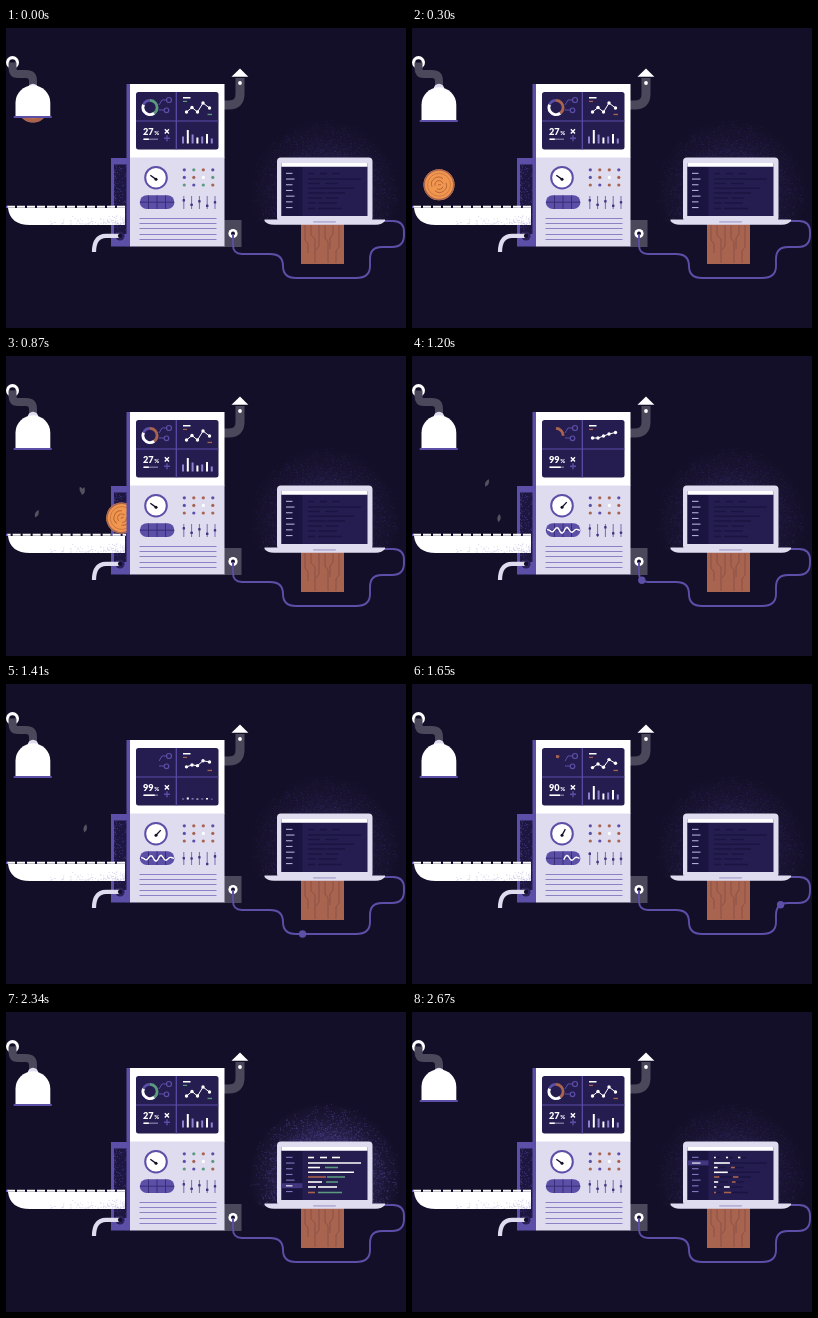
These frames come from a looping animation (400 by 300 pixels, 2700 ms). An HTML page with a canvas:

```html
<!DOCTYPE html>
<html lang="en">
<head>
<meta charset="utf-8">
<title>Machine</title>
<style>
html, body { margin: 0; width: 100%; height: 100%; overflow: hidden; background: #140f28 }
canvas { display: block }
</style>
</head>
<body>
<canvas id="stage" width="400" height="300"></canvas>
<script>
const ctx = document.getElementById('stage').getContext('2d');
const LOOP = 2700;
const NIGHT = '#140f28', INK = '#251d50', SHADE = '#1a1440', PURPLE = '#5c4fa8', PALE = '#dfdcf0',
  PIPE = '#4c485c', WHITE = '#fff', RUST = '#a96450', ORANGE = '#f0964f', GREEN = '#5c9a80';

const clamp = v => Math.max(0, Math.min(1, v));
const ramp = (t, a, b) => clamp((t - a) / (b - a));
const smooth = (t, a, b) => { const p = ramp(t, a, b); return p * p * (3 - 2 * p); };
const mix = (a, b, p) => a + (b - a) * p;

let seed = 7;
const random = () => (seed = seed * 16807 % 2147483647) / 2147483647;

function rect(x, y, w, h, color, r = 0) {
  ctx.fillStyle = color;
  ctx.beginPath();
  ctx.roundRect(x, y, w, h, r);
  ctx.fill();
}
function disc(x, y, r, color) {
  ctx.fillStyle = color;
  ctx.beginPath();
  ctx.arc(x, y, r, 0, 7);
  ctx.fill();
}
function ring(x, y, r, color, width, from = 0, to = 2 * Math.PI) {
  ctx.strokeStyle = color;
  ctx.lineWidth = width;
  ctx.beginPath();
  ctx.arc(x, y, r, from, to);
  ctx.stroke();
}
function fill(d, color) {
  ctx.fillStyle = color;
  ctx.fill(new Path2D(d));
}
function line(d, color, width, cap = 'butt') {
  ctx.strokeStyle = color;
  ctx.lineWidth = width;
  ctx.lineCap = cap;
  ctx.stroke(new Path2D(d));
}
function dots(list, color, size = 0.8) {
  ctx.fillStyle = color;
  for (const [x, y] of list) ctx.fillRect(x, y, size, size);
}
const scatter = (count, place) => Array.from({ length: count }, place);

const CABLE = 'M227 206V217Q227 226 236 226H264Q277 226 277 238T290 250H350Q364 250 364 238V231Q364 219 376 219H386Q398 219 398 207V204Q398 193 387 193H378';
const cable = document.createElementNS('http://www.w3.org/2000/svg', 'path');
cable.setAttribute('d', CABLE);
const cableLength = cable.getTotalLength();

const GLOW = { x: 319, y: 166, r: 76 };
const glowGrains = scatter(12000, () => [243 + random() * 155, 90 + random() * 104])
  .filter(([x, y]) => random() > Math.hypot(x - GLOW.x, y - GLOW.y) / GLOW.r);
const beltGrains = scatter(110, () => [118 - 75 * random() ** 2, 196 - 11 * random() * random()]);
const panelGrains = scatter(130, () => [108 + 12 * random() ** 2, 137 + 68 * random()]);
const halo = ctx.createRadialGradient(GLOW.x, GLOW.y, 0, GLOW.x, GLOW.y, GLOW.r);
halo.addColorStop(0.4, 'rgba(92,79,168,.42)');
halo.addColorStop(0.72, 'rgba(92,79,168,.15)');
halo.addColorStop(1, 'rgba(92,79,168,0)');

function dispenser(t) {
  const lift = 4 * (1 - smooth(t, 20, 180) + smooth(t, 2500, 2660));
  disc(6.5, 34.5, 6.5, WHITE);
  disc(6.5, 34.5, 3.3, NIGHT);
  line('M6.500 34.500V40Q6.500 46 12 46H20Q27 46 27 53V60', PIPE, 8);
  disc(27, 61, 5.3, PALE);
  const bottom = 92.5 - lift, shoulder = 76.7 - lift / 2;
  fill(`M9.500 ${bottom}V${shoulder}A17.400 17.400 0 0 1 44.300 ${shoulder}V${bottom}Z`, WHITE);
  rect(7.5, bottom - 0.5, 38.5, 2, PURPLE, 1);
}

function coin(t) {
  if (t > 960) return;
  const roll = Math.max(0, (t - 400) / 200);
  const x = 27 + 16 * roll * roll;
  const fall = ramp(t, 30, 310);
  const hop = ramp(t, 310, 440);
  const y = mix(79, 162, fall * fall) - 14 * hop * (1 - hop);
  ctx.save();
  ctx.translate(x, y);
  ctx.rotate((x - 27) / 15.5);
  disc(0, 0, 15.5, t < 30 ? RUST : ORANGE);
  ring(0, 0, 14.7, RUST, 1.4);
  ring(0, 0, 11.5, '#c8743f', 0.8);
  line('M-7 2A7 7 0 0 1 4 -6M-4 1A4 4 0 0 1 4 -1M7 -2A7 7 0 0 1 -4 6M4 2A4 4 0 0 1 -2 4M-1 0H2', '#b76638', 1);
  ctx.restore();
}

function leaf(t, born, x, y, dx, dy, turn) {
  const age = t - born;
  const alpha = ramp(age, 0, 120) * (1 - ramp(age, 560, 740));
  if (alpha <= 0) return;
  ctx.save();
  ctx.globalAlpha = alpha;
  ctx.translate(x + dx * age / 1000, y + dy * age / 1000);
  ctx.rotate(turn + Math.sin(age / 180) * 0.35);
  fill('M0 -4.200Q3.500 0 0 4.200Q-3.500 0 0 -4.200Z', '#55515f');
  ctx.restore();
}

function belt(t) {
  fill('M2 180H119V197H24Q4 197 2 180Z', WHITE);
  dots(beltGrains, '#c8c3e2');
  ctx.setLineDash([8, 2]);
  ctx.lineDashOffset = -60 * smooth(t, 420, 960);
  line('M1 178.800H120', WHITE, 2);
  ctx.setLineDash([]);
  rect(0, 178, 1.5, 2, PURPLE);
}

function inlet() {
  rect(105, 130, 16, 88.5, PURPLE);
  rect(108, 136.5, 13, 69.5, '#1c1640');
  dots(panelGrains, '#493e8a');
}

function donut(t, accent) {
  const shown = 1 - ramp(t, 1000, 1270) + ramp(t, 1620, 2050);
  const parts = [[0, 0.4, accent], [0.4, 0.82, WHITE], [0.82, 1, PURPLE]];
  for (const [from, to, color] of parts) {
    const end = Math.min(to, shown);
    if (end > from) ring(144, 79.5, 7.1, color, 2.8, (from - 0.25) * 2 * Math.PI, (end - 0.25) * 2 * Math.PI);
  }
  line('M153 77L156 72H160M153 82H158', PURPLE, 1);
  ring(163, 72, 2.5, PURPLE, 1.2);
  ring(160.5, 82.3, 2.3, PURPLE, 1.2);
}

function lineChart(t, accent) {
  const m = smooth(t, 1000, 1180) - smooth(t, 1300, 1550) + smooth(t, 1570, 1850) - smooth(t, 1960, 2200);
  const points = [[180.5, 84, 82], [186, 79.5, 82], [191.5, 84, 80], [197, 75, 78], [203.5, 80, 76.5]]
    .map(([x, low, high]) => [x, mix(low, high, m)]);
  line('M' + points.join('L'), WHITE, 1);
  for (const [x, y] of points) disc(x, y, 1.7, WHITE);
  rect(177, 69, 7.5, 1.5, WHITE);
  rect(177, 72.8, 4, 1.2, accent);
  if (m < 0.9) rect(201.5, 85.8, 4.5, 1.3, accent);
}

function counter(value) {
  ctx.fillStyle = WHITE;
  ctx.font = '900 9.2px Lato, sans-serif';
  ctx.fillText(Math.round(value), 137, 107.3);
  ctx.font = '900 6px Lato, sans-serif';
  ctx.fillText('%', 148.3, 107);
  rect(137.5, 110.5, 14.5, 1.5, '#75709a');
  rect(137.5, 110.5, 3 + value / 12, 1.5, WHITE);
  line('M158.800 101.200L163 105.400M163 101.200L158.800 105.400', WHITE, 1.4);
  line('M158 110.200H164M161 107.200V113.200', PURPLE, 1.4);
}

function bars(t) {
  const scale = 1 - smooth(t, 1000, 1150) + smooth(t, 1350, 1600);
  [7, 13.5, 9, 6, 7, 9.5, 5].forEach((h, i) =>
    rect(176 + i * 4.8, 115.5 - h * scale, 2, h * scale, i % 2 ? WHITE : '#8e83cf'));
}

function gauge(t) {
  disc(150, 149.7, 10.8, WHITE);
  ring(150, 149.7, 10.8, PURPLE, 2);
  ctx.save();
  ctx.translate(150, 151.3);
  ctx.rotate(-0.95 + 1.7 * (ramp(t, 1000, 1180) - ramp(t, 1560, 2170)));
  line('M0 1V-7', NIGHT, 1.3);
  ctx.restore();
  disc(150, 151.3, 1.5, NIGHT);
}

function scope(t) {
  rect(133.8, 167.3, 34.6, 13.8, PURPLE, 6.9);
  line('M142.500 167.500V181M151 167.500V181M159.500 167.500V181M134 174.200H168', '#352b70', 0.9);
  const left = 135 + 33 * ramp(t, 1560, 1740);
  const right = 135 + 33 * ramp(t, 1000, 1170);
  if (right - left < 1) return;
  ctx.strokeStyle = WHITE;
  ctx.lineWidth = 1.4;
  ctx.beginPath();
  for (let x = left; x <= right; x++)
    ctx.lineTo(x, 174.2 - 3 * Math.cos((x - 155) * 0.62) * Math.sin((x - 134) / 34 * Math.PI));
  ctx.stroke();
}

function controls(t, accent) {
  const colors = [PURPLE, accent, RUST, PURPLE, RUST, WHITE, accent];
  for (let row = 0; row < 3; row++)
    for (let col = 0; col < 4; col++)
      disc(178.3 + col * 9.5, 141.8 + row * 7.6, 1.6, colors[(col + row * 3) % 7]);
  const active = smooth(t, 1000, 1150) - smooth(t, 1850, 2050);
  [172, 176.5, 173, 177.5, 174].forEach((y, i) => {
    const x = 177.8 + i * 7.8;
    line(`M${x} 168V181`, PURPLE, 0.8);
    rect(x - 1.2, y - 1 + 2.5 * active * Math.sin(t / 95 + i * 2), 2.4, 2.6, '#41367f', 0.7);
  });
}

function machine(t, accent) {
  disc(114, 208, 4.6, '#2b2358');
  line('M88 224Q88 208 100 207.800H113.500', PALE, 4.2);
  disc(114, 207.9, 2.1, NIGHT);
  line('M218 77H223Q234 77 234 66V50', PIPE, 9);
  fill('M225.500 48.700L234 40.500L242.300 48.700Z', WHITE);
  disc(234, 55, 1.9, WHITE);
  rect(218, 192, 17.5, 27, PIPE);
  rect(120.5, 56, 4, 162.5, PURPLE);
  rect(124, 56, 94.5, 74, WHITE);
  rect(124, 129.5, 94.5, 89, PALE);

  rect(130, 64, 82.5, 57.5, INK, 2.5);
  line('M170.300 64V121.500M130 93H212.500', PURPLE, 1.2);
  donut(t, accent);
  lineChart(t, accent);
  counter(27 + 72 * (ramp(t, 1000, 1180) - ramp(t, 1600, 1997)));
  bars(t);

  gauge(t);
  scope(t);
  controls(t, accent);
  for (let i = 0; i < 5; i++) rect(133.5, 190 + Math.round(i * 5.2), 77, 1, '#8b81c4');
}

function power(t) {
  disc(227, 205.5, 4.6, WHITE);
  disc(227, 205.5, 2, NIGHT);
  line(CABLE, PURPLE, 1.9);
  const travelled = (t - 1152) * 0.389;
  if (travelled > 0 && travelled < cableLength) {
    const p = cable.getPointAtLength(travelled);
    disc(p.x, p.y, 3.7, PURPLE);
  }
}

function glow(t) {
  const level = smooth(t, 1750, 2100) - smooth(t, 2450, 2680);
  ctx.globalAlpha = mix(0.4, 1, level);
  rect(243, 90, 156, 104, halo);
  dots(glowGrains, 'rgba(92,79,168,.42)', 1);
  ctx.globalAlpha = 1;
}

// Each row: y, then x, width and colour of its pieces.
const CODE = [
  [145.5, [302, 6, WHITE], [314, 7, WHITE], [326, 8, WHITE]],
  [151, [302, 53, WHITE]],
  [155.5, [302, 12, WHITE], [319, 13, GREEN]],
  [160.3, [302, 46, WHITE]],
  [165, [302, 18, RUST], [321, 18, GREEN]],
  [170, [302, 14, WHITE], [320, 12, GREEN]],
  [175, [302, 8, WHITE], [312, 19, WHITE]],
  [180.5, [302, 7, RUST], [312, 24, GREEN]]
];

function code(t, accent) {
  const kept = 1 - 0.7 * smooth(t, 2440, 2670);
  CODE.forEach(([y, ...pieces], i) => {
    const typed = 60 * ramp(t, 1900 + i * 40, 2020 + i * 40);
    for (const [x, w, color] of pieces) {
      rect(x, y - 0.8, w, 1.5, SHADE);
      const shown = clamp((typed - (x - 302)) / w) * w * kept;
      if (shown > 0) rect(x, y - 0.8, shown, 1.6, color == GREEN ? accent : color);
    }
  });
}

function laptop(t, accent) {
  rect(295, 196, 43, 40, RUST);
  line('M299 197V212L302 216V225M305 197V207L309 211V235M313 197V218L310 222M319 197V210L322 214V235M327 197V206L324 210V221M333 197V219L330 223V235', '#7d4842', 0.7);

  rect(271, 129.5, 95.5, 64, PALE, 4);
  rect(275.5, 135, 86, 53, INK);
  rect(275.5, 138.5, 21, 49.5, SHADE);
  rect(275.5, 135, 86, 3.7, WHITE);

  const on = t > 1850;
  const selected = t < 2050 ? 4 : t < 2450 ? 5 : t < 2550 ? 3 : 1;
  if (on) rect(275.5, 142.7 + selected * 5.7, 21, 5, '#41367f');
  for (let i = 0; i < 7; i++)
    rect(280, 144.8 + i * 5.7, i % 3 == 1 ? 8.5 : 6.5, 1.1, on && i == selected ? WHITE : on ? '#8177bd' : '#b3add6');
  code(t, accent);

  fill('M258.500 191.500H379V193Q376 196.700 370 196.700H268Q261 196.700 258.500 193Z', PALE);
  rect(307, 193, 23, 1.7, '#b6b0d5', 0.8);
}

function draw() {
  const t = performance.now() % LOOP;
  const accent = t < 90 || (t > 2050 && t < 2600) ? GREEN : RUST;
  rect(0, 0, 400, 300, NIGHT);
  inlet();
  coin(t);
  dispenser(t);
  leaf(t, 400, 60, 95, 33, 84, -0.6);
  leaf(t, 380, 22, 120, 18, 77, 0.3);
  leaf(t, 900, 69, 102, 20, 83, 0.1);
  leaf(t, 700, 72, 121, 30, 82, 0);
  belt(t);
  machine(t, accent);
  glow(t);
  power(t);
  laptop(t, accent);
  requestAnimationFrame(draw);
}
draw();
</script>
</body>
</html>
```
